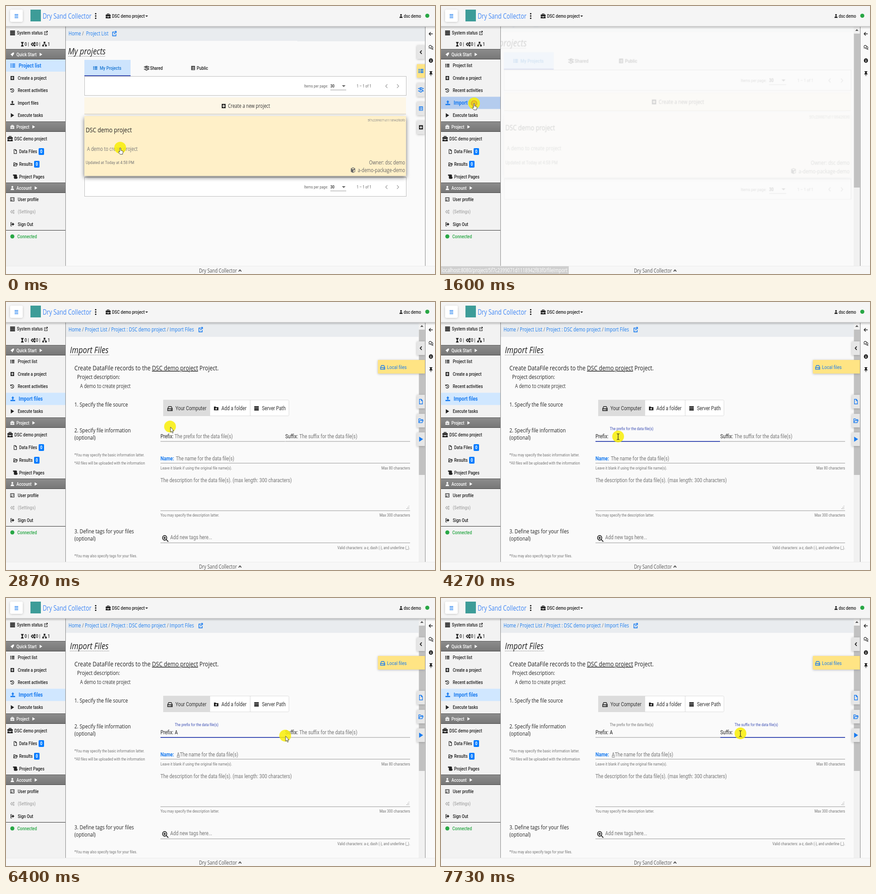
Recreate the animation shown at these times as an HTML page. Size 947 by 592 pixels, loop 8000 ms.

```html
<!DOCTYPE html>
<html lang="en">
<head>
<meta charset="utf-8">
<title>Import files</title>
<style>
html, body { margin: 0; width: 100%; height: 100%; overflow: hidden; background: #fafafa; }
svg { display: block; width: 947px; height: 592px; }
text { white-space: pre; }
.ui { font-family: Roboto, sans-serif; }
.doc { font-family: "Open Sans", sans-serif; }
.grow { transform-box: fill-box; transform-origin: center; }
.page { transform-origin: 528px 337px; }
</style>
</head>
<body>
<svg id="stage" viewBox="0 0 947 592"></svg>
<script>
const LOOP = 8000;
const APP = 'Dry Sand Collector', PROJECT = 'DSC demo project', USER = 'dsc demo';
const BLUE = '#1a7cf0', INDIGO = '#3f51b5', INK = '#222', GREY = '#757575';
const SQUEEZE = { ui: .853, doc: .81 };   // the screen is shown narrower than it was laid out
const sheet = [];

// Icons drawn in a 16 unit box around 0,0; a leading "~" marks outline icons.
const ICONS = {
  list: 'M-8-6h4v3h-4zm0 4.5h4v3h-4zm0 4.5h4v3h-4zM-2-6h10v3h-10zm0 4.5h10v3h-10zm0 4.5h10v3h-10z',
  plus: 'M-7-7h14v14h-14zM-1.3-4.5v3.2h-3.2v2.6h3.2v3.2h2.6v-3.2h3.2v-2.6h-3.2v-3.2z',
  upload: 'M0-8l5 5.5h-3v5h-4v-5h-3zM-8 3h16v4h-16z',
  play: 'M-6-7.5L7 0-6 7.5z',
  user: 'M0-7.5a3.7 3.7 0 1 1 0 7.4 3.7 3.7 0 1 1 0-7.4zM-7 7.5c0-9 14-9 14 0z',
  case: 'M-8-4h4v-3h8v3h4v5h-16zM-2-4h4v-1.2h-4zM-8 2h6v2h4v-2h6v5h-16z',
  hour: 'M-5-8h10v2l-4 6 4 6v2h-10v-2l4-6-4-6z',
  net: 'M-3-8h6v5h-6zM-8 2h6v5h-6zM2 2h6v5h-6zM-.7-3h1.4v2.3h5v2.7h-1.4v-1.3h-8.6v1.3h-1.4v-2.7h5z',
  server: 'M-8-7h16v4h-16zm0 5h16v4h-16zm0 5h16v4h-16z',
  ext: '~M1-5h-7v12h12v-6M-1 2L7-7M2-7h5v5',
  rocket: 'M7-7C0-7-2-4-4-2L-8 0l4 2 2 2 2 4 2-4C4 2 7 0 7-7z',
  history: '~M-6-3a6.3 6.3 0 1 1 0 6M-7-7v4.5h4.5M0-3v4l3 1',
  file: '~M-5-7h6l4 4v10h-10zM1-7v4h4',
  folder: '~M-7 6v-11h5l2 2h6v3M-7 6l3-6h11l-3 6z',
  dir: 'M-8-6h6l2 2h8v10h-16zM-1-2v2h-2v2h2v2h2v-2h2v-2h-2v-2z',
  scroll: 'M-8-7h11q3 0 3 3v5h2v2q0 4-4 4h-6q-3 0-3-3v-7h-3z',
  card: '~M-7-6h14v12h-14zM-5 3h5M-2.5-3v3M3-2h2M3 1h2',
  out: 'M1-6l7 6-7 6v-4h-5v-4h5zM-2-7h-5v14h5v-2h-3v-10h3z',
  shake: '~M-8-3h3l3-2h4l3 2h3M-8 3h3l3 2.5h3l3-2.5h4M0-4l-3 3.5 2 1.5 3-2 4 4',
  sheet: 'M-7-7h14v14h-14zM-5-4v2h2v-2zm0 3.5v2h2v-2zm0 3.5v2h2v-2zM-2-4v2h7v-2zm0 3.5v2h7v-2zm0 3.5v2h7v-2z',
  cube: 'M0-8l7 3v10l-7 3-7-3v-10zM1 1v5l4.5-2v-5zM-5-4l5 2 5-2-5-2z',
  disk: '~M-7 1l3-6h8l3 6v5h-14zM-7 1h14M3 3.5h2',
  gears: '~M-6 0a3.5 3.5 0 1 0 7 0a3.5 3.5 0 1 0-7 0M3-4a2 2 0 1 0 4 0a2 2 0 1 0-4 0M3 4a2 2 0 1 0 4 0a2 2 0 1 0-4 0M-8 0h2M-2.5-6v2M-2.5 4v2',
  chats: '~M-7 4l2-2c-4-3-2-8 3-8s7 6 2 8q-3 1-5 0M3-2c5 0 5 4 3 6l1 3-3-2q-3 1-5-1',
  info: 'M0-8a8 8 0 1 1 0 16a8 8 0 1 1 0-16zM-1.2-5v2.4h2.4v-2.4zM-1.5-1v5.5h3v-5.5z',
  pin: 'M-5-8h10v2h-2v4l3 3v1h-5v5l-1 1-1-1v-5h-5v-1l3-3v-4h-2z',
  back: '~M7 0h-13M-1-6l-6 6 6 6',
  left: '~M3-6l-6 6 6 6',
  right: '~M-3-6l6 6-6 6',
  zoom: '~M-7-1a5.5 5.5 0 1 0 11 0a5.5 5.5 0 1 0-11 0M3 3l5 5M-1.5-4v6M-4.5-1h6'
};

const text = (x, y, s, size, fill = INK, o = {}) => {
  const font = o.font || 'ui';
  const place = o.free ? '' : `transform="translate(${x} ${y + size * .36}) scale(${SQUEEZE[font]} 1)"`;
  return `<text class="${font} ${o.cls || ''}" ${place} font-size="${size}" fill="${fill}"` +
    ` font-weight="${o.weight || 400}" font-style="${o.style || 'normal'}" text-anchor="${o.anchor || 'start'}">${s}</text>`;
};
const doc = (x, y, s, size, fill, o) => text(x, y, s, size, fill, { font: 'doc', ...o });
const bold = (x, y, s, size = 10.5, fill = INK) => text(x, y, s, size, fill, { weight: 500 });
const rect = (x, y, w, h, fill, more = '') => `<rect x="${x}" y="${y}" width="${w}" height="${h}" fill="${fill}" ${more}/>`;
const icon = (name, x, y, size, color = INK, weight = 2) => {
  const d = ICONS[name], line = d[0] === '~';
  const paint = line ? `fill="none" stroke="${color}" stroke-width="${weight}"` : `fill="${color}" fill-rule="evenodd"`;
  return `<path transform="translate(${x} ${y}) scale(${size / 16 * .9} ${size / 16})" d="${line ? d.slice(1) : d}" ${paint}/>`;
};
const down = (x, y, r = 4, fill = INK) => `<path d="M${x - r} ${y - r / 2}h${2 * r}l${-r} ${r}z" fill="${fill}"/>`;
const link = s => `<tspan fill="${BLUE}">${s}</tspan>`;
const group = (cls, ...parts) => `<g class="${cls}">${parts.join('')}</g>`;

// Keyframes given as [ms, css] pairs.
function animate(name, frames, ease = 'linear') {
  const all = [...frames, [LOOP, frames[frames.length - 1][1]]];
  sheet.push(`@keyframes ${name}{${all.map(([ms, css]) => `${ms / LOOP * 100}%{${css}}`).join('')}}` +
    `.${name}{animation:${name} ${LOOP}ms ${ease} infinite}`);
}
let shown = 0;
function during(ranges, ...parts) {
  const name = 'show' + shown++;
  const frames = ranges[0][0] ? [[0, 'opacity:0']] : [];
  for (const [from, to] of ranges) {
    frames.push([from, 'opacity:1']);
    if (to) frames.push([to, 'opacity:0']);
  }
  animate(name, frames, 'step-end');
  return group(name, ...parts);
}

const NAVIGATE = 1470, FOCUS_PREFIX = 3700, FOCUS_SUFFIX = 7330;

function header() {
  return rect(0, 45, 947, 6, 'url(#drop)') + rect(0, 0, 947, 45, '#f5f5f5') + rect(0, 44.5, 947, 1, '#c4c4c4') +
    rect(9, 9.5, 28, 26, '#999', 'rx="3" filter="url(#soft)" opacity=".6"') + rect(9, 8, 28, 27, '#fff', 'rx="3"') +
    [18, 21.5, 25].map(y => rect(19, y, 8, 1.5, BLUE)).join('') +
    rect(54, 8, 23, 26, '#3d9c98') + doc(81, 22, APP, 15.4, '#3f86f5', { weight: 500 }) +
    [17, 22, 27].map(y => `<circle cx="198" cy="${y}" r="1.6"/>`).join('') +
    icon('case', 225.5, 22, 12) + bold(234, 22, PROJECT) + down(310.5, 22.5, 3) +
    icon('user', 872, 22, 9) + bold(878, 22, USER, 10.2) + '<circle cx="930" cy="21.5" r="4.5" fill="#28a745"/>';
}

function band(y, name, label, arrow) {
  return rect(0, y - 11, 131, 21, 'url(#band)') + rect(0, y - 12, 131, 1, '#555') + rect(0, y + 10, 131, 1, '#444') +
    icon(name, 14, y, 9.5, '#fff') + bold(23, y, label, 10.5, '#fff') + icon('play', arrow, y, 8, '#fff');
}
const row = (name, y, label, color = INK) => icon(name, 14, y, 10, color) + bold(26, y, label, 10.5, color);
const active = (name, y, label, bg = '#d0e7ff') => rect(0, y - 13.5, 131, 27, bg) +
  icon(name, 15, y, 11.5, BLUE) + text(28, y, label, 12, BLUE, { weight: 700 });
const badge = (x, y) => rect(x, y - 7.5, 12, 15, '#007bff', 'rx="2"') +
  text(x + 6, y, '0', 10, '#fff', { anchor: 'middle', weight: 700 });

function sidebar() {
  return rect(0, 45, 131, 547, '#f2f2f2') + rect(131, 45, 1, 547, '#888') +
    icon('server', 14.5, 59.5, 12) + bold(24, 59, 'System status') + icon('ext', 88, 59.5, 9) +
    icon('hour', 36, 84.5, 10) + bold(41, 84.5, '0 |') + icon('gears', 60, 84.5, 11, INK, 2.6) +
    bold(66, 84.5, '0 |') + icon('net', 85, 84.5, 11) + bold(92, 84.5, '1') +
    band(107, 'rocket', 'Quick Start', 77) +
    during([[0, NAVIGATE]], active('list', 131.5, 'Project list')) +
    during([[NAVIGATE]], row('list', 131.5, 'Project list')) +
    row('plus', 159, 'Create a project') + row('history', 186.5, 'Recent activities') +
    during([[1130, NAVIGATE]], rect(0, 200.5, 131, 27, '#e2e2e2')) +
    during([[0, NAVIGATE]], row('upload', 214, 'Import files')) +
    during([[NAVIGATE, 1900]], active('upload', 214, 'Import files', '#b4ccee')) +
    during([[1900]], active('upload', 214, 'Import files')) +
    row('play', 241.5, 'Execute tasks') +
    band(267, 'case', 'Project', 61) +
    icon('case', 9, 293, 13) + bold(18.5, 293, PROJECT) +
    icon('file', 20.5, 321.5, 10) + bold(29, 321.5, 'Data Files') + badge(72, 321.5) +
    icon('folder', 21, 349.5, 10) + bold(29, 349.5, 'Results') + badge(62, 349.5) +
    icon('scroll', 20.5, 377, 11) + bold(29, 377, 'Project Pages') +
    band(402, 'user', 'Account', 66) +
    row('card', 427, 'User profile') + row('gears', 454.5, '(Settings)', '#aaa') + row('out', 482, 'Sign Out') +
    rect(0, 495, 131, 1, '#333') +
    '<circle cx="14" cy="509" r="4.5" fill="#28a745"/>' + bold(25, 509, 'Connected', 10.5, '#28a745');
}

const breadcrumb = (s, x) => rect(132, 45, 793, 32, '#e9ecef') + doc(138, 61, s, 12, '#6c757d') + icon('ext', x, 61, 11, BLUE, 2.4);
const title = (x, y, s, w) => doc(x, y, s, 20.4, INK, { style: 'italic' }) +
  `<path d="M${x} ${y + 11}h${w}" stroke="#777" stroke-dasharray="1.5 1"/>`;

function pager(top, y) {
  return rect(173.5, top + .5, 710, 42, '#fff', 'stroke="#bdbdbd"') +
    text(658, y, 'Items per page:', 9, '#666') + text(716, y, '30', 9.5, INK, { weight: 500 }) +
    down(745.5, y, 4, '#666') + rect(716, y + 8, 35, 1, '#999') + text(774, y, '1 – 1 of 1', 9, '#666') +
    icon('left', 840, y, 11, '#9a9a9a') + icon('right', 865, y, 11, '#9a9a9a');
}

function projects() {
  const right = { anchor: 'end' };
  return group('page leave',
    breadcrumb(`${link('Home')} /  ${link('Project List')}`, 239),
    title(137, 100, 'My projects', 82),
    rect(173, 119, 102, 36, '#cde4fd'), rect(173, 153, 102, 2, INDIGO),
    icon('list', 197, 137, 10, '#1976d2'), bold(207, 137, 'My Projects', 10.5, '#1976d2'),
    icon('shake', 310.5, 137, 13), bold(318, 137, 'Shared'), icon('sheet', 413, 137, 10.5), bold(421, 137, 'Public'),
    pager(155, 177),
    rect(173, 202, 710, 37, '#fdf6e6'), rect(173, 238, 710, 1.5, '#d8d3c6'),
    pager(378, 400),
    rect(173, 247, 710, 132, '#000', 'class="lift" filter="url(#deep)"'),
    icon('plus', 480.5, 221, 11), doc(490, 221, 'Create a new project', 12, '#333'),
    rect(173, 243, 710, 132.5, '#fff0c8', 'class="card"'),
    doc(176, 273.5, PROJECT, 15), doc(179, 316, 'A demo to create project', 12, GREY),
    text(176, 345.5, 'Updated at Today at 4:58 PM', 9.8, GREY),
    text(881, 252.5, '5f7c2399071d1118942f83f0', 7.6, '#888', right),
    doc(881, 345.5, 'Owner: ' + USER, 12, '#666', right),
    icon('cube', 766, 362.5, 12, '#666'), doc(881, 363, 'a-demo-package-demo', 12, '#666', right));
}

function field(x, id, label, hint, width) {
  return text(x, 297, label, 12) + text(0, 0, hint, 12, GREY, { free: true, cls: id + 'Label' }) +
    rect(x, 307.5, width, 1, '#949494') + rect(x, 307, width, 2, INDIGO, `class="grow ${id}Line"`);
}

function importer() {
  const side = (y, s) => doc(151, y, s, 13);
  const note = (x, y, s, anchor) => text(x, y, s, 9, GREY, { anchor });
  const rule = y => rect(341, y, 551, 1, '#949494');
  const nameHint = 'The name for the data file(s)';
  return group('page enter',
    breadcrumb(['Home', 'Project List', 'Project : ' + PROJECT, 'Import Files'].map(link).join(' / '), 429.5),
    title(141, 106, 'Import Files', 87),
    doc(151, 145.5, `Create DataFile records to the <tspan text-decoration="underline">${PROJECT}</tspan> Project.`, 15),
    doc(157, 165.5, 'Project description:', 13), doc(163.5, 186, 'A demo to create project', 12, '#333'),
    side(226.5, '1. Specify the file source'),
    side(283.5, '2. Specify file information'), side(299.5, '(optional)'),
    note(151, 338, '*You may specify the basic information latter.'),
    note(151, 355.5, '*All files will be uploaded with the information'),
    side(506.5, '3. Define tags for your files'), side(522.5, '(optional)'),
    note(151, 561, '*You may also specify tags for your files.'),
    rect(347.5, 216.5, 277, 35, '#fff', 'rx="2" stroke="#ddd"'), rect(347, 216, 103, 36, '#dcdcdc'),
    rect(449.5, 216, 1, 36, '#d5d5d5'), rect(538.5, 216, 1, 36, '#d5d5d5'),
    icon('disk', 362, 235, 13), text(374, 234.5, 'Your Computer', 12, '#333'),
    icon('dir', 464, 235, 11), text(475.5, 234.5, 'Add a folder', 12, '#333'),
    icon('server', 553, 235, 11), text(565, 234.5, 'Server Path', 12, '#333'),
    field(341, 'prefix', 'Prefix:', 'The prefix for the data file(s)', 275),
    field(616.5, 'suffix', 'Suffix:', 'The suffix for the data file(s)', 275.5),
    during([[4730]], text(372.5, 297, 'A', 12)),
    during([[4800, 5330], [5870, 6400]], rect(379.5, 290, 1, 13, '#222')),
    text(341, 345.5, 'Name:', 12, BLUE, { weight: 700 }),
    during([[0, 4800]], text(375, 345.5, nameHint, 12, GREY)),
    during([[4800]], text(377, 345.5, `<tspan text-decoration="underline">A</tspan>${nameHint}`, 12, GREY)),
    rule(355.5), note(341, 367, 'Leave it blank if using the original file name(s).'), note(892, 367, 'Max 80 characters', 'end'),
    text(341, 393.5, 'The description for the data file(s). (max length: 300 characters)', 12, GREY),
    '<path d="M884 456.5h6M886.5 453.5h3.5M889 450.5h1" stroke="#888" stroke-dasharray="1.5 1"/>',
    rule(460.5), note(341, 471, 'You may specify the description latter.'), note(892, 471, 'Max 300 characters', 'end'),
    icon('zoom', 351.5, 522, 15), text(362.5, 520, 'Add new tags here...', 12, GREY),
    rule(531.5), note(892, 542.5, 'Valid characters: a-z, dash (-), and underline (_).', 'end'));
}

function scrollbar() {
  return rect(911, 45, 14, 530, '#f1f1f1') + '<path d="M914.5 55l3.5-4 3.5 4z" fill="#555"/>' +
    during([[1500, 1670]], rect(911.5, 61, 13, 340, '#c1c1c1')) + during([[1670]], rect(911.5, 61, 13, 321, '#c1c1c1'));
}

function sideTabs() {
  const tab = (y, name, color, bg = '#e6e6e6', size = 11, weight = 2) =>
    rect(907, y - 14, 18, 30, '#777', 'filter="url(#soft)" opacity=".5"') + rect(907, y - 15, 18, 30, bg) +
    icon(name, 916, y, size, color, weight);
  const collapse = tab(102, 'left', INK, undefined, 10, 3);
  return group('tabsOut', collapse, tab(143.5, 'list', BLUE, '#ffe484', 12), tab(185, 'shake', BLUE, undefined, 14),
      tab(226.5, 'sheet', BLUE), tab(268, 'plus', INK)) +
    group('tabsIn', collapse, tab(220, 'file', BLUE, undefined, 12), tab(262, 'folder', BLUE, undefined, 12),
      tab(303, 'play', BLUE, undefined, 12),
      group('local', rect(821, 129, 104, 30, '#777', 'filter="url(#soft)" opacity=".5"'), rect(821, 128, 104, 30, '#ffe484'),
        icon('disk', 831.5, 144, 12, BLUE), text(841, 144, 'Local files', 11.3, BLUE)));
}

function rail() {
  return rect(925, 46, 22, 546, '#fafafa') + rect(925, 46, 1, 530, '#888') +
    icon('back', 938, 61.5, 10, INK, 2.6) + icon('chats', 938, 91, 11, INK, 1.6) +
    icon('info', 938, 120.5, 10) + icon('pin', 938, 149.5, 11);
}

function footer() {
  return rect(0, 574, 947, 18, '#f7f7f7') + rect(0, 574, 947, .6, '#e4e4e4') + doc(426, 584.5, APP, 12, '#555') +
    '<path d="M513.5 586.5l3-3.5 3 3.5" fill="none" stroke="#444" stroke-width="1.8"/>' +
    group('status', rect(0, 575, 282, 17, '#cfcfcf'),
      doc(1, 584, 'localhost:8080/project/5f7c2399071d1118942f83f0/fileImport', 12, '#fff'));
}

function pointer() {
  const paint = 'fill="#fff" stroke="#333" stroke-width=".9" stroke-linejoin="round"';
  const hand = `<path d="M-1 1q1.3-1.3 2.4 0v5l4.2 1.2q1 .5.8 2l-1 5.3h-5.6l-4-5q.2-2 2.2-.6l1 1z" ${paint}/>`;
  const arrow = `<path d="M1 1v11.5l2.3-2.3 1.8 4.3 1.9-.9-1.8-4h3.2z" ${paint}/>`;
  const beam = '<path d="M-3-6q2.5 0 3 1q.5-1 3-1M-3 7q2.5 0 3-1q.5 1 3 1M0-5v11" fill="none" stroke="#222" stroke-width="1.2"/>';
  return group('mouse', '<circle r="13" fill="#f8ee08" opacity=".86"/>',
    '<g class="click"><circle r="12" fill="#f08a1c" fill-opacity=".45" stroke="#e8641b" stroke-width="3"/></g>',
    during([[0, 1930]], hand),
    during([[1930, 3470], [5940, 6600], [6730, 7200]], arrow),
    during([[3470, 5940], [6600, 6730], [7200]], beam));
}

const at = (x, y, ease = 'linear') => `transform:translate(${x}px,${y}px);animation-timing-function:${ease}`;
animate('mouse', [[0, at(252, 313)], [800, at(252, 313)], [1000, at(103, 230, 'ease-out')], [1160, at(73, 215)],
  [1670, at(73, 215, 'ease-in-out')], [2470, at(327, 308)], [2600, at(327, 308)], [2870, at(362, 275, 'ease-out')],
  [3400, at(391, 297)], [5870, at(391, 297, 'ease-in')], [6130, at(500, 272)], [6400, at(616, 304, 'ease-out')],
  [6670, at(657, 300)], [6960, at(662, 314)], [7270, at(661, 299)]]);

const ripple = start => [[start - 10, 'transform:scale(.15);opacity:0'], [start, 'transform:scale(.15);opacity:.95'],
  [start + 320, 'transform:scale(1);opacity:0'], [start + 330, 'transform:scale(.15);opacity:0']];
animate('click', [[0, 'transform:scale(.15);opacity:0'], ...[1470, 3670, 7270].flatMap(ripple)]);

animate('leave', [[0, 'opacity:1;transform:none'], [1400, 'opacity:1;transform:none'],
  [1600, 'opacity:.18;transform:translate(-6.5px,0) scale(1.078)'], [1670, 'opacity:0;transform:translate(-6.5px,0) scale(1.1)']]);
animate('enter', [[0, 'opacity:0;transform:scale(.93)'], [1670, 'opacity:0;transform:scale(.93);animation-timing-function:ease-out'],
  [2070, 'opacity:1;transform:none']]);
animate('card', [[0, 'fill:#fff0c8'], [870, 'fill:#fff0c8'], [1000, 'fill:#fdf3d8'], [1200, 'fill:#fcf9f0']]);
animate('lift', [[0, 'opacity:.55'], [1000, 'opacity:.5'], [1250, 'opacity:.15']]);
animate('tabsOut', [[0, 'opacity:1'], [1400, 'opacity:1'], [1560, 'opacity:0']]);
animate('tabsIn', [[0, 'opacity:0'], [1870, 'opacity:0'], [2130, 'opacity:1']]);
animate('local', [[0, 'transform:translate(86px,0)'], [2130, 'transform:translate(86px,0);animation-timing-function:ease-out'],
  [2470, 'transform:none']]);
animate('status', [[0, 'opacity:0'], [1200, 'opacity:0'], [1330, 'opacity:1'], [1870, 'opacity:1'], [2000, 'opacity:0']]);

function floatLabel(id, x, start) {
  const rest = `transform:translate(${x}px,301.3px) scale(.853,1);fill:${GREY}`;
  const up = `transform:translate(${x + .5}px,283px) scale(.64,.75);fill:${INDIGO}`;
  const frames = [[0, rest], [start, rest + ';animation-timing-function:cubic-bezier(.25,.8,.25,1)'], [start + 400, up]];
  const line = [[0, 'opacity:0;transform:scaleX(.5)'], [start, 'opacity:0;transform:scaleX(.5)'], [start + 240, 'opacity:1;transform:none']];
  if (start < FOCUS_SUFFIX) {
    frames.push([FOCUS_SUFFIX, up], [FOCUS_SUFFIX + 130, up.replace(INDIGO, GREY)]);
    line.push([FOCUS_SUFFIX, 'opacity:1;transform:none'], [FOCUS_SUFFIX + 130, 'opacity:0;transform:none']);
  }
  animate(id + 'Label', frames);
  animate(id + 'Line', line);
}
floatLabel('prefix', 372, FOCUS_PREFIX);
floatLabel('suffix', 647.5, FOCUS_SUFFIX);

const blur = (id, size) => `<filter id="${id}" x="-20%" y="-20%" width="140%" height="140%"><feGaussianBlur stdDeviation="${size}"/></filter>`;
const defs = `<defs>
  <linearGradient id="drop" x2="0" y2="1"><stop stop-color="#000" stop-opacity=".22"/><stop offset="1" stop-color="#000" stop-opacity="0"/></linearGradient>
  <linearGradient id="band" x2="0" y2="1"><stop stop-color="#8c8c8c"/><stop offset="1" stop-color="#777"/></linearGradient>
  ${blur('soft', 2.5)}${blur('deep', 5)}
  <clipPath id="content"><path d="M132 45h793v530h-793z"/></clipPath></defs>`;
const body = defs + rect(0, 0, 947, 592, '#fafafa') +
  `<g clip-path="url(#content)">${projects()}${importer()}${during([[1500]], scrollbar())}${sideTabs()}</g>` +
  rail() + sidebar() + header() + footer() + pointer();

document.head.appendChild(document.createElement('style')).textContent = sheet.join('\n');
document.getElementById('stage').innerHTML = body;
</script>
</body>
</html>
```
